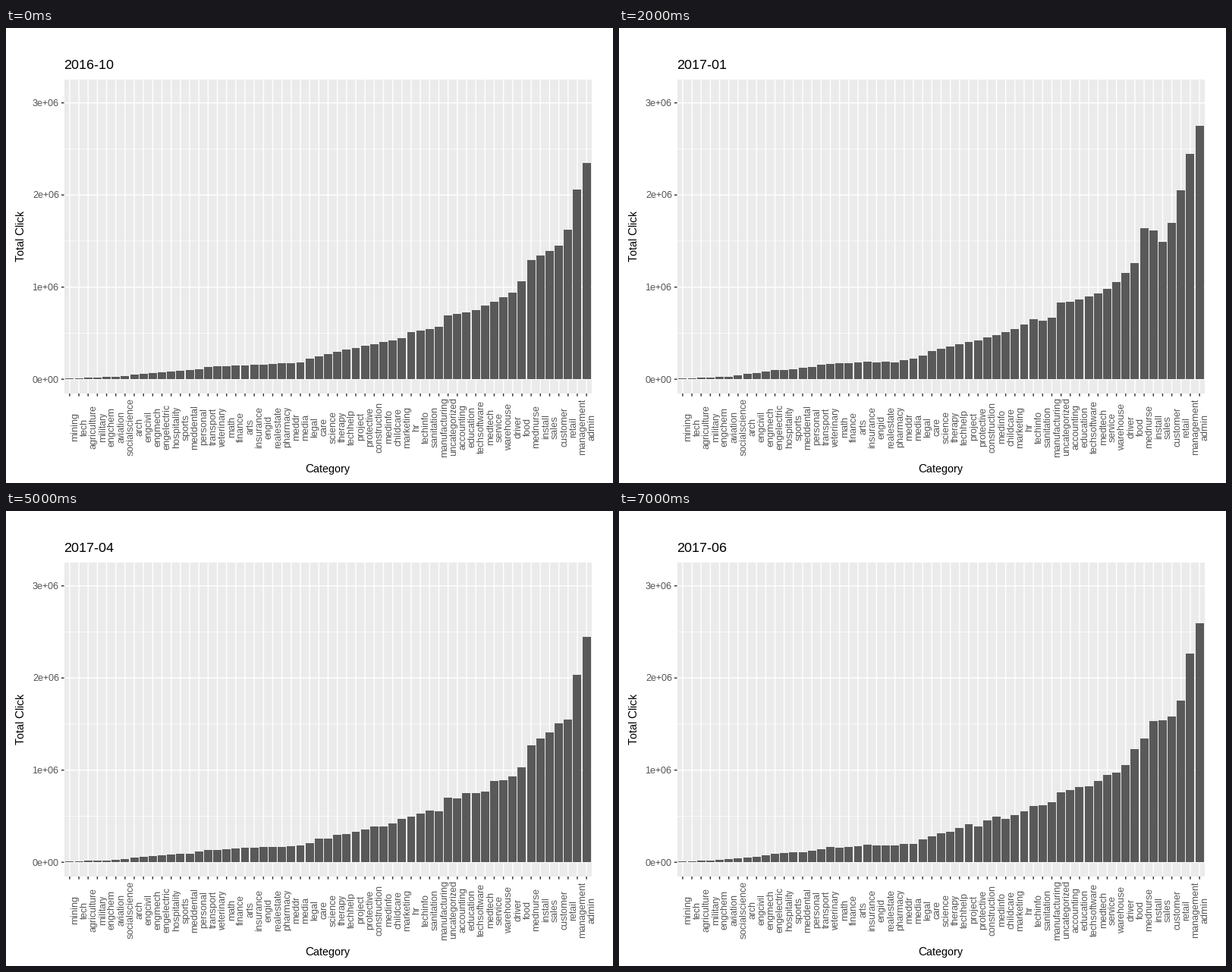
These frames come from a looping animation (800x600 px, 8 s). A matplotlib script:

```python
import matplotlib.pyplot as plt
import numpy as np
from matplotlib.animation import FuncAnimation

W, H, DPI = 800, 600, 96
PT = 72 / DPI  # points per pixel
LEFT, RIGHT, TOP, BOTTOM = 76.6, 772.4, 68, 482
BASE, MILLION = 463.2, 121.5

# Whole-pixel glyph spacing, as in hinted screen text
plt.rcParams.update({"font.family": "Liberation Sans",
                     "text.hinting": "native", "text.hinting_factor": 1})

NAMES = """mining tech agriculture military engchem aviation socialscience arch
engcivil engmech engelectric hospitality sports meddental personal transport
veterinary math finance arts insurance engid realestate pharmacy meddr media
legal care science therapy techhelp project protective construction medinfo
childcare marketing hr techinfo sanitation manufacturing uncategorized
accounting education techsoftware medtech service warehouse driver food
mednurse install sales customer retail management admin""".split()

N = len(NAMES)
STEP = (RIGHT - LEFT) / (N + 0.2)
XS = LEFT + STEP * (0.6 + np.arange(N))

# Rising profile of the first month: rank -> height in pixels
PROFILE = {0: 0.8, 5: 3.2, 10: 9.5, 14: 13, 15: 16.2, 25: 22, 26: 27, 30: 39,
           36: 54, 37: 62, 40: 69, 41: 84, 44: 91, 48: 114, 49: 129.5,
           50: 157, 53: 176, 54: 197.5, 55: 250, 56: 285.5}
GROWTH = [1, 0.93, 1.19, 1, 1, 1, 1.07, 1.14]

# Categories are sorted by the first month; later months scatter around it.
rng = np.random.default_rng(4)
scatter = rng.normal(1, 0.035, (len(GROWTH), N))
scatter[0] = 1
heights = np.interp(np.arange(N), list(PROFILE), list(PROFILE.values()))
heights = heights * np.array(GROWTH)[:, None] * scatter


def month_name(i):
    m = 9 + i + (i > 1)  # December is missing
    return f"{2016 + m // 12}-{m % 12 + 1:02}"


fig = plt.figure(figsize=(W / DPI, H / DPI), dpi=DPI, facecolor="white")
ax = fig.add_axes([0, 0, 1, 1])
ax.set(xlim=(0, W), ylim=(H, 0))
ax.axis("off")


def rect(x0, y0, x1, y1, color, z):
    """Filled box with its edges on whole pixels."""
    x0, y0, x1, y1 = np.round([x0, y0, x1, y1])
    return ax.add_patch(plt.Rectangle((x0, y0), x1 - x0, y1 - y0, fc=color,
                                      lw=0, zorder=z, snap=False))


def hlines(ys, x0, x1, color, width):
    ax.hlines(ys, x0, x1, colors=color, lw=width * PT, zorder=2).set_snap(False)


def vlines(xs, y0, y1, color, width):
    ax.vlines(xs, y0, y1, colors=color, lw=width * PT, zorder=2).set_snap(False)


def label(x, y, s, size, color="black", ha="center", turn=0):
    return ax.text(x, y, s, size=size * PT, color=color, ha=ha, va="baseline",
                   rotation=turn, rotation_mode="anchor", zorder=5)


rect(LEFT, TOP, RIGHT, BOTTOM, "#EBEBEB", 1)
majors = BASE - MILLION * np.arange(4)
hlines(majors[:3] - MILLION / 2, LEFT, RIGHT, "white", 0.71)
hlines(majors, LEFT, RIGHT, "white", 1.42)
vlines(XS, TOP, BOTTOM, "white", 1.42)
hlines(majors, LEFT - 3.67, LEFT, "#333333", 1.42)
vlines(XS, BOTTOM, BOTTOM + 3.67, "#333333", 1.42)

for i, y in enumerate(majors):
    label(70, y + 4.3, f"{i}e+{'06' if i else '00'}", 12, "#4D4D4D", "right")
for x, name in zip(XS, NAMES):
    label(x + 10.4, 526, name, 12, "#4D4D4D", turn=90)
label(424, 586, "Category", 15)
label(24, 274, "Total Click", 15, turn=90)

title = label(76, 54, "", 18, ha="left")
half = 0.45 * STEP
bars = [rect(x - half, BASE, x + half, BASE, "#595959", 3) for x in XS]


def update(i):
    title.set_text(month_name(i))
    for bar, h in zip(bars, heights[i]):
        bar.set_height(round(BASE - h) - bar.get_y())
    return [title, *bars]


anim = FuncAnimation(fig, update, frames=len(GROWTH), interval=1000, repeat=True)
plt.show()
```
